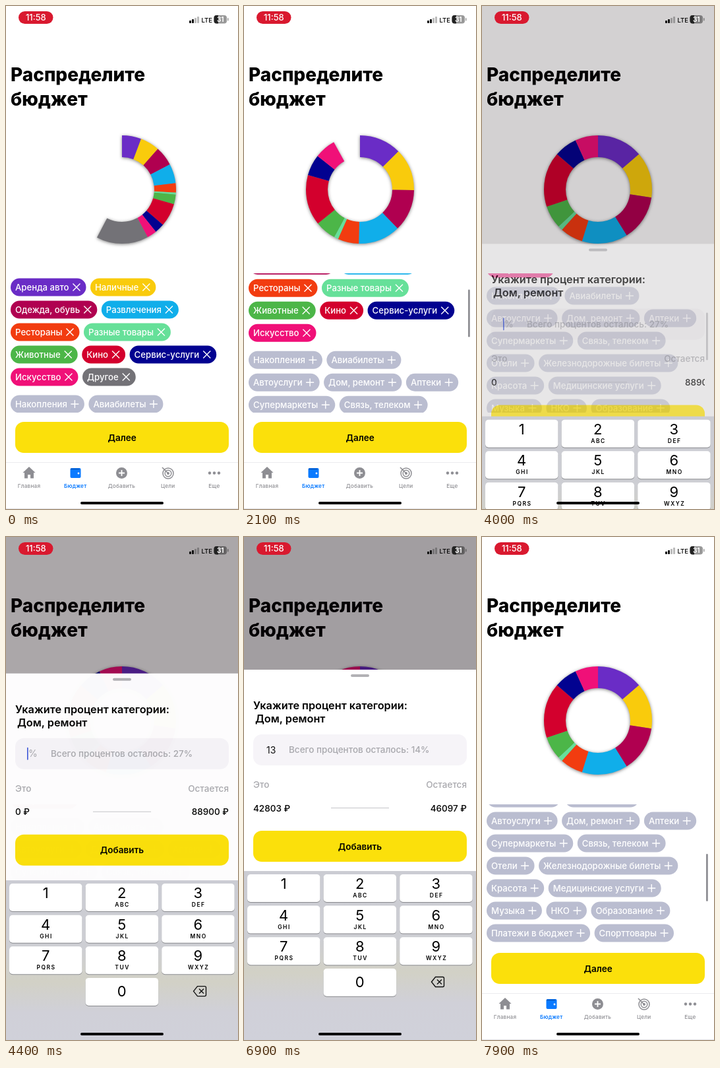
Animation, 352 px wide and 762 px high, one loop 8000 ms. Source, as an HTML page:

```html
<!DOCTYPE html>
<html lang="ru">
<head>
<meta charset="utf-8">
<style>
html, body { margin: 0; width: 352px; height: 762px; overflow: hidden; background: #fff; }
svg { display: block; font-family: Inter, sans-serif; }
text { white-space: pre; }
#pie { filter: drop-shadow(0 1px 2.5px rgba(0, 0, 0, .5)); }
</style>
</head>
<body>
<svg id="stage" width="352" height="762" viewBox="0 0 352 762"></svg>
<script>
const DURATION = 8000, REMOVED_AT = 1400, BUDGET = 88900;
const GRAY = '#8e8e93', YELLOW = '#fbe00b', BLUE = '#0a7aff';

// name, percent, colour
const categories = [
  ['Аренда авто', 10, '#6a2cc6'], ['Наличные', 10, '#f9cb0c'],
  ['Одежда, обувь', 10, '#b00050'], ['Развлечения', 10, '#10aeea'],
  ['Рестораны', 5, '#f23c10'], ['Разные товары', 1, '#66e099'],
  ['Животные', 5, '#4cb648'], ['Кино', 12, '#d3002d'], ['Сервис-услуги', 5, '#020290'],
  ['Искусство', 5, '#f01078'], ['Другое', 27, '#737277']
];
const chosenRows = [2, 2, 2, 3, 2];
const wideRows = ['Накопления|Авиабилеты', 'Автоуслуги|Дом, ремонт|Аптеки', 'Супермаркеты|Связь, телеком',
  'Отели|Железнодорожные билеты', 'Красота|Медицинские услуги', 'Музыка|НКО|Образование',
  'Платежи в бюджет|Спорттовары'];
const narrowRows = ['Накопления|Авиабилеты', 'Автоуслуги|Дом, ремонт', 'Аптеки|Супермаркеты'];

const $ = id => document.getElementById(id);
const clamp = x => Math.min(1, Math.max(0, x));
const progress = (t, from, to) => clamp((t - from) / (to - from));
const smooth = p => p * p * (3 - 2 * p);
const easeOut = p => 1 - (1 - p) ** 2;
const decay = (t, from, tau) => t < from ? 1 : Math.exp((from - t) / tau);

const text = (x, y, content, size, attrs = '') =>
  `<text x="${x}" y="${y}" font-size="${size}" ${attrs}>${content}</text>`;
const rect = (x, y, w, h, r, fill, attrs = '') =>
  `<rect x="${x}" y="${y}" width="${w}" height="${h}" rx="${r}" fill="${fill}" ${attrs}/>`;
const line = (d, stroke, width) => `<path d="${d}" fill="none" stroke="${stroke}" stroke-width="${width}"/>`;
const MIDDLE = 'text-anchor="middle"', END = 'text-anchor="end"';

const ruler = document.createElement('canvas').getContext('2d');
ruler.font = '500 13.2px Inter, sans-serif';

function chipRow(names, y, colour, icon) {
  let x = 7;
  return names.map((name, i) => {
    const textWidth = ruler.measureText(name).width, width = textWidth + 33;
    const chip = `<g data-name="${name}" transform="translate(${x} ${y})">` +
      rect(0, -13.5, width, 27, 13.5, colour(i)) +
      text(7, 4.8, name, 13.2, 'fill="#fff" font-weight="500"') +
      `<g transform="translate(${textWidth + 18.5} 0)">${line(icon, '#fff', 1.4)}</g></g>`;
    x += width + 6.5;
    return chip;
  }).join('');
}

function chosenChips() {
  let first = 0;
  return chosenRows.map((count, row) => {
    const part = categories.slice(first, first += count);
    return chipRow(part.map(c => c[0]), 426 + row * 34, i => part[i][2], 'M-5.5-5.5l11 11m0-11l-11 11');
  }).join('');
}

const freeChips = rows => rows.map((row, i) =>
  chipRow(row.split('|'), 603 + i * 34, () => '#babdd0', 'M-6 0h12M0-6v12')).join('');

const button = (y, label) => rect(14, y, 324, 47, 13, YELLOW) +
  text(176, y + 28.5, label, 13.5, MIDDLE + ' font-weight="600"');

function tabBar() {
  const labels = ['Главная', 'Бюджет', 'Добавить', 'Цели', 'Еще'];
  return rect(0, 691, 352, 71, 0, '#fff') + rect(0, 691, 352, 1, 0, '#ececee') +
    labels.map((label, i) => text(35 + i * 70.2, 730, label, 8.2,
      `${MIDDLE} letter-spacing=".2" font-weight="${i == 1 ? 600 : 500}" fill="${i == 1 ? BLUE : GRAY}"`)).join('') +
    `<path d="M25.5 707L35 698l9.500 9H42v8.500h-5V710h-4v5.500h-5V707z" fill="${GRAY}"/>` +
    rect(97.5, 700, 16, 15, 2, BLUE) + line('M98 701.500h13.500', '#0750b0', 1.2) +
    '<circle cx="110" cy="708" r="1.400" fill="#fff"/>' +
    `<circle cx="175.500" cy="707.500" r="8.500" fill="${GRAY}"/>` + line('M171 707.500h9m-4.500-4.500v9', '#fff', 1.8) +
    [8, 4.8].map(r => `<circle cx="246" cy="708" r="${r}" fill="none" stroke="${GRAY}" stroke-width="1.500"/>`).join('') +
    `<circle cx="246" cy="708" r="2" fill="${GRAY}"/>` + line('M237 699l9 9', GRAY, 1.6) +
    [309, 316, 323].map(x => `<circle cx="${x}" cy="707.500" r="2.200" fill="${GRAY}"/>`).join('') +
    rect(0, 761, 352, 1, 0, '#e4e4e8');
}

function statusBar() {
  return rect(19, 8, 52.5, 19, 9.5, '#d9192f') +
    text(45.3, 22.2, '11:58', 13, MIDDLE + ' fill="#fff" font-weight="500"') +
    [0, 1, 2, 3].map(i => rect(278 + i * 4, 22 - i * 2, 3, 4 + i * 2, .8, i < 2 ? '#111' : '#0004')).join('') +
    text(296.5, 24.6, 'LTE', 9.5, 'font-weight="500"') +
    rect(315.5, 14, 19.5, 12.5, 4, '#0006') +
    '<path d="M322 14v12.500h-2.500a4 4 0 0 1-4-4V18a4 4 0 0 1 4-4z" fill="#222"/>' +
    rect(336, 18, 1.5, 4.5, .7, '#0006') +
    text(325.3, 24, '31', 10, MIDDLE + ' fill="#fff" font-weight="700"');
}

function sheet() {
  const soft = 'fill="#a8a8ad" font-weight="500"';
  return `<g id="panel">${rect(0, 201, 352, 561, 0, '#fff')}${rect(14, 299, 324, 47, 13, '#f6f4f8')}</g>` +
    rect(162, 208, 28, 4, 2, '#b2b1b5') +
    text(14, 261, 'Укажите процент категории:', 16.3, 'font-weight="600"') +
    text(17, 281, 'Дом, ремонт', 16.3, 'font-weight="600"') +
    text(34, 327.5, '', 14, 'id="entry"') + rect(0, 313, 1.6, 19, .8, '#3a55d8', 'id="cursor"') +
    text(68, 327.3, '', 13.5, 'id="left" ' + soft) +
    text(14, 380, 'Это', 13.5, soft) + text(338, 380, 'Остается', 13.5, END + ' ' + soft) +
    text(14, 415.5, '', 13.5, 'id="amount" font-weight="500"') +
    `<g clip-path="url(#fieldClip)">${text(338, 415.5, '', 13.5, 'id="rest" font-weight="500"')}</g>` +
    rect(132, 410, 88, 1, 0, '#c4c4c8') + button(445, 'Добавить');
}

function keyboard() {
  const letters = ['', 'ABC', 'DEF', 'GHI', 'JKL', 'MNO', 'PQRS', 'TUV', 'WXYZ'];
  const key = (digit, column, row, sub) => {
    const x = 5 + column * 115.6, y = 511 + row * 47.6;
    return rect(x, y + 1, 110.5, 42, 5, '#898a8e') +
      rect(x, y, 110.5, 42, 5, '#fff', `id="key${digit}"`) +
      text(x + 55.2, y + (digit ? 22 : 28), digit, 22, MIDDLE) +
      text(x + 56, y + 35, sub, 8.5, MIDDLE + ' letter-spacing="1.500" font-weight="600"');
  };
  return rect(0, 506, 352, 256, 0, 'url(#keys)') +
    letters.map((sub, i) => key(i + 1, i % 3, Math.floor(i / 3), sub)).join('') + key(0, 1, 3, '') +
    line('M284.500 674l6-7.500h11a2 2 0 0 1 2 2v11a2 2 0 0 1-2 2h-11zM293 670.500l7 7m0-7l-7 7', '#111', 1.4);
}

$('stage').innerHTML = `
<defs>
  <clipPath id="listClip"><rect y="405" width="352" height="211"/></clipPath>
  <clipPath id="fieldClip"><rect y="395" width="338" height="30"/></clipPath>
  <linearGradient id="keys" x2="0" y2="1">
    <stop stop-color="#cbccd3"/><stop offset=".4" stop-color="#cdced3"/>
    <stop offset=".6" stop-color="#d2d1c6"/><stop offset=".78" stop-color="#d0d0d8"/>
    <stop offset="1" stop-color="#d0d1da"/>
  </linearGradient>
</defs>
${rect(0, 0, 352, 762, 0, '#fff')}
${text(7, 113.5, 'Распределите', 28, 'font-weight="800"')}
${text(7, 150.5, 'бюджет', 28, 'font-weight="800"')}
<g id="pie">${categories.map(c => `<circle cx="176" cy="278" r="65.500" fill="none" stroke="${c[2]}"
  stroke-width="33" pathLength="100" transform="rotate(-90 176 278)"/>`).join('')}</g>
<g clip-path="url(#listClip)"><g id="list">
  ${chosenChips()}
  <g id="narrow">${freeChips(narrowRows)}</g>
  <g id="wide">${freeChips(wideRows)}</g>
</g></g>
${rect(340, 405, 2.8, 66, 1.4, '#8f8f94', 'id="thumb"')}
${button(630, 'Далее')}
${tabBar()}
${rect(0, 0, 352, 762, 0, '#0c0008', 'id="dim"')}
<g id="sheet">${sheet()}</g>
<g id="keyboard">${keyboard()}</g>
${statusBar()}
${rect(113, 751, 126, 4, 2, '#000')}`;

const slices = [...$('pie').children];
const otherChip = document.querySelector('[data-name="Другое"]');
const set = (id, name, value) => $(id).setAttribute(name, value);
const show = (element, visible) => element.setAttribute('display', visible ? 'inline' : 'none');

function drawPie(t, removed) {
  const scale = removed
    ? 1 + 27 / 73 * smooth(progress(t, REMOVED_AT, 2500))
    : .576 + .424 * easeOut(progress(t, 0, 1050));
  let start = 0;
  slices.forEach((slice, i) => {
    const size = categories[i][1] * scale;
    slice.setAttribute('stroke-dasharray', `${size} 200`);
    slice.setAttribute('stroke-dashoffset', -start);
    start += size;
  });
  show(slices[10], !removed);
}

function drawList(t, removed) {
  const scroll = 43 * smooth(progress(t, 200, 950)) + 151 * smooth(progress(t, 1900, 2700)) -
    30 * smooth(progress(t, 2800, 3500)) + 43 * smooth(progress(t, 7500, 7900));
  set('list', 'transform', `translate(0 ${-scroll})`);
  show(otherChip, !removed);
  show($('narrow'), !removed);
  show($('wide'), removed);
  set('thumb', 'y', 405.5 + scroll * .36);
  set('thumb', 'height', removed ? 72 : 66);
  set('thumb', 'opacity', t < 4400 ? progress(t, 200, 350) * (1 - progress(t, 3900, 4300)) : progress(t, 7500, 7650));
}

function drawForm(t) {
  const typed = t < 4950 ? '' : t < 5350 ? '1' : '13', percent = +typed;
  const amount = Math.floor(percent / 27 * BUDGET), reflowed = t > 4400;
  const unit = reflowed ? ' ₽' : '';
  $('entry').textContent = typed || '%';
  set('entry', 'fill', typed ? '#111' : '#a8a8ad');
  set('cursor', 'x', typed ? 33.8 + $('entry').getComputedTextLength() : 32);
  set('cursor', 'opacity', t > 7000 || t > 5850 && (t - 5850) % 1000 < 400 ? 0 : 1);
  $('left').textContent = `Всего процентов осталось: ${27 - percent}%`;
  $('amount').textContent = amount + unit;
  $('rest').textContent = BUDGET - amount + unit;
  set('rest', 'x', reflowed ? 338 : 308);
  set('rest', 'text-anchor', reflowed ? 'end' : 'start');
  set('key1', 'fill', t > 4880 && t < 5020 ? '#d4d5da' : '#fff');
  set('key3', 'fill', t > 5280 && t < 5420 ? '#d4d5da' : '#fff');
}

function drawModal(t) {
  const open = t > 3850 && t < 7600, closing = t > 7080;
  const offset = 561 * (closing ? smooth(progress(t, 7080, 7541)) : decay(t, 3850, 120));
  const keysOffset = 256 * (closing ? 1 - decay(t, 7080, 128) : decay(t, 3850, 190));
  const dim = closing ? 1 - progress(t, 7080, 7430) : 1 - decay(t, 3850, 236);
  for (const id of ['dim', 'sheet', 'keyboard']) show($(id), open);
  set('dim', 'opacity', .38 * dim);
  set('sheet', 'transform', `translate(0 ${offset})`);
  set('sheet', 'opacity', 1 - .32 * clamp(offset / 160));
  set('panel', 'opacity', 1 - clamp(offset / 480));
  set('keyboard', 'transform', `translate(0 ${keysOffset})`);
  if (open) drawForm(t);
}

function frame() {
  const t = performance.now() % DURATION, removed = t >= REMOVED_AT;
  drawPie(t, removed);
  drawList(t, removed);
  drawModal(t);
  requestAnimationFrame(frame);
}
frame();
</script>
</body>
</html>
```
